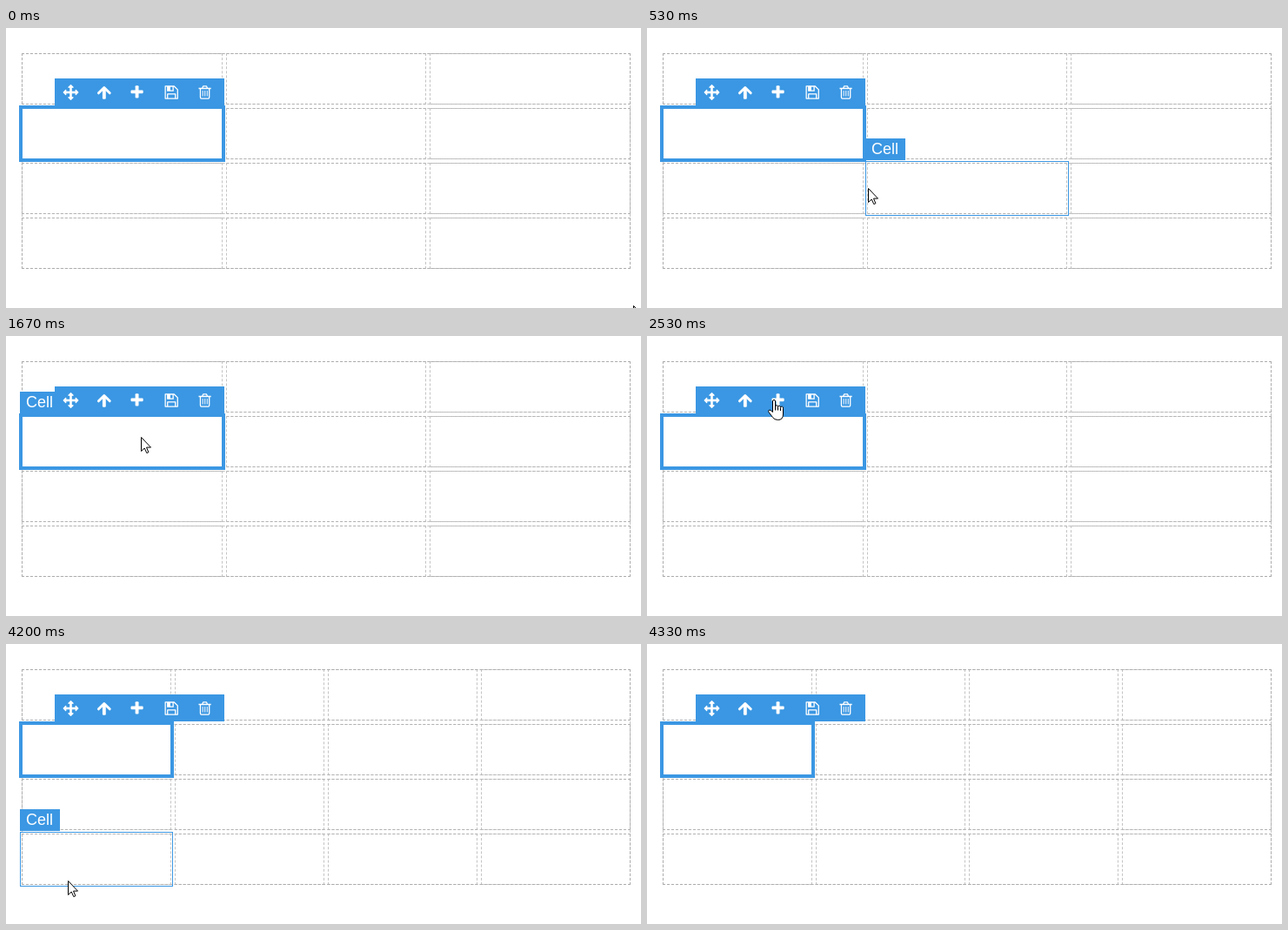
Animation of 730x322 px, one loop 5540 ms. Source, as an HTML page:

```html
<!DOCTYPE html>
<html lang="en">
<head>
<meta charset="utf-8">
<title>Table editor</title>
<style>
  html, body { margin: 0; width: 100%; height: 100%; overflow: hidden; background: #fff; }
  #stage { position: relative; width: 730px; height: 322px; overflow: hidden; }
  #stage div, #stage svg { position: absolute; box-sizing: border-box; }
  .dash { outline: 1px dashed rgba(170, 170, 170, .7); outline-offset: -3px; }
  #hover { border: 1px solid #3b97e3; }
  #selected { border: 4px solid #3b97e3; }
  #label {
    width: 46px; height: 25px; padding-left: 7px; background: #3b97e3; color: #fff;
    font: 18px/25px "Liberation Sans", Arial, sans-serif;
  }
  #tools { left: 56px; top: 58px; background: #3b97e3; }
  .cursor { left: 0; top: 0; overflow: visible; }
</style>
</head>
<body>
<div id="stage">
  <div id="hover"></div>
  <div id="selected"></div>
  <div id="label">Cell</div>
  <!-- Icons sit on a 14 unit grid, 18px wide, one every 39px -->
  <svg id="tools" width="195" height="31" fill="none" stroke="#fff" stroke-linejoin="round">
    <g id="move" transform="translate(9.5 7) scale(1.2857)"></g>
    <g transform="translate(48.5 7) scale(1.2857)">
      <path d="M1.5 7.65L6.48 2.67L11.45 7.65" stroke-width="2.28" stroke-linecap="round"/>
      <rect x="4.98" y="3" width="3" height="10" rx=".8" fill="#fff" stroke="none"/>
    </g>
    <g transform="translate(87.5 7) scale(1.2857)" fill="#fff" stroke="none">
      <rect y="5" width="11" height="3" rx=".75"/>
      <rect x="4" y="1" width="3" height="11" rx=".75"/>
    </g>
    <g transform="translate(126.5 7) scale(1.2857)">
      <path d="M.5 1.5H8.4L11.5 4.6V12.5H.5ZM2.5 12.5V8.5H9.5V12.5"/>
      <path d="M2 1.5H8V6H2ZM5 2V5H7V2Z" fill="#fff" fill-rule="evenodd" stroke="none"/>
    </g>
    <g transform="translate(165.5 7) scale(1.2857)">
      <path d="M0 3.5H11M3.2 3.3L4 1.5H7L7.8 3.3M1.5 3.5V11.5Q1.5 12.5 2.4 12.5H8.6Q9.5 12.5 9.5 11.5V3.5"/>
      <path d="M3.63 5.5V10.5M5.63 5.5V10.5M7.63 5.5V10.5" stroke-width=".75"/>
    </g>
  </svg>
  <svg id="arrow" class="cursor" width="12" height="20" fill="#fff" stroke="#000">
    <path d="M.5 .5V16.5L4.2 13L6.8 18.6L8.9 17.7L6.5 12.1H11.5Z"/>
  </svg>
  <svg id="hand" class="cursor" width="19" height="25" fill="#fff" stroke="#000">
    <path d="M5.5 14.5V2a1.5 1.5 0 0 1 3 0V8a1.5 1.5 0 0 1 3 .5a1.5 1.5 0 0 1 3 .7a1.5 1.5 0 0 1 3 1V17
      Q17.5 23.5 11.5 23.5Q7.5 23.5 5.5 20.5L1 14.6Q.2 13 1.3 12.2Q2.8 11.4 5.5 14.5Z"/>
    <path d="M8.5 8V12.5M11.5 8.5V12.5M14.5 9.5V13" fill="none"/>
  </svg>
</div>
<script>
const LOOP = 5540, FPS = 15, ROWS = 4, SPLIT_TICK = 43;
const $ = id => document.getElementById(id);
const colX = (i, n) => Math.round(16 + 704 * i / n);
const rowY = i => 27 + 63 * i;

function place(el, x0, y0, x1, y1) {
  Object.assign(el.style, {
    left: x0 + 'px', top: y0 + 'px', width: x1 - x0 + 'px', height: y1 - y0 + 'px'
  });
}

function makeGrid(cols) {
  const grid = document.createElement('div');
  const add = (...box) => {
    const el = document.createElement('div');
    el.className = 'dash';
    place(el, ...box);
    grid.append(el);
  };
  add(16, 27, 720, 279);
  for (let r = 0; r < ROWS; r++) {
    add(16, rowY(r), 720, rowY(r + 1));
    for (let c = 0; c < cols; c++) add(colX(c, cols), rowY(r), colX(c + 1, cols), rowY(r + 1));
  }
  $('stage').prepend(grid);
  return grid;
}

const grids = { 3: makeGrid(3), 4: makeGrid(4) };

$('move').innerHTML = [0, 90, 180, 270].map(a =>
  `<g transform="translate(7 7) rotate(${a})">
     <path d="M0 0V-5" stroke-width="2"/>
     <path d="M0 -6.4L2 -4.5H-2Z" fill="#fff"/>
   </g>`).join('');

// Pointer moves: first tick, last tick, from x y, to x y, easing power for x and y
const MOVES = [
  [0, 14, 721, 319, 163, 119, 2.14, 1.33],
  [24, 33, 163, 119, 142, 73, 4.06, .57],
  [36, 38, 142, 73, 145, 73, 1, 1],
  [42, 43, 145, 73, 145, 75, 1, 1],
  [53, 54, 145, 75, 145, 76, 1, 1],
  [54, 65, 145, 76, 52, 324, .932, .916]
];

function pointer(tick) {
  const [k0, k1, x0, y0, x1, y1, px, py] = MOVES.filter(m => m[0] <= tick).pop();
  const left = 1 - Math.min(1, (tick - k0) / (k1 - k0));
  const ease = (a, b, p) => Math.round(b + (a - b) * left ** p);
  return [ease(x0, x1, px), ease(y0, y1, py)];
}

// Ticks land on whole hundredths of a second
function tickAt(t) {
  const k = Math.floor((t + 5) * FPS / 1000);
  return Math.round(k * 100 / FPS) * 10 > t ? k - 1 : k;
}

const show = (el, on) => { el.style.visibility = on ? 'visible' : 'hidden'; };

function draw(tick) {
  const cols = tick < SPLIT_TICK ? 3 : 4;
  const [x, y] = pointer(tick);
  show(grids[3], cols === 3);
  show(grids[4], cols === 4);
  place($('selected'), 15, rowY(1) - 1, colX(1, cols) + 1, rowY(2) + 1);

  const onTools = x >= 56 && x < 251 && y >= 58 && y < 89;
  const onCell = !onTools && x >= 16 && x < 720 && y >= 27 && y < 279;
  show($('hover'), onCell);
  show($('label'), onCell);
  if (onCell) {
    const r = Math.floor((y - 27) / 63);
    let c = 0;
    while (x >= colX(c + 1, cols)) c++;
    place($('hover'), colX(c, cols), rowY(r), colX(c + 1, cols), rowY(r + 1));
    $('label').style.left = colX(c, cols) + 'px';
    $('label').style.top = rowY(r) - 26 + 'px';
  }

  show($('arrow'), !onTools);
  show($('hand'), onTools);
  $('arrow').style.transform = `translate(${x}px, ${y}px)`;
  $('hand').style.transform = `translate(${x - 6}px, ${y}px)`;
}

const start = performance.now();
function frame() {
  draw(tickAt((performance.now() - start) % LOOP));
  requestAnimationFrame(frame);
}
draw(0);
requestAnimationFrame(frame);
</script>
</body>
</html>
```
